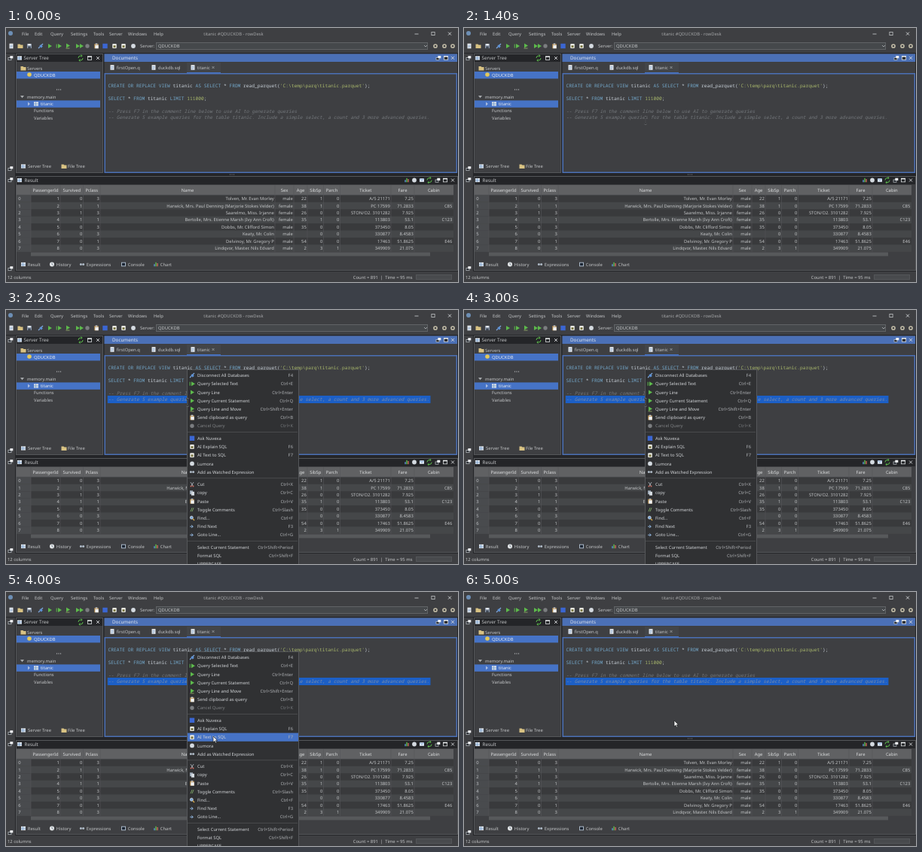
Recreate the animation shown at these times as an HTML page. Size 600x338 px, loop 8000 ms.

```html
<!DOCTYPE html>
<html lang="en">
<head>
<meta charset="utf-8">
<title>SQL editor</title>
<style>
html, body { margin: 0; width: 100%; height: 100%; overflow: hidden; background: #242527; }
svg { display: block; width: 600px; height: 338px; }
text { font: 5.85px "Noto Sans", "Open Sans", sans-serif; text-rendering: geometricPrecision; white-space: pre; }
.head { font-size: 6.3px; }
.code { font: 6.245px "Noto Sans Mono", "Liberation Mono", monospace; }
.note { font-style: italic; }
</style>
</head>
<body>
<svg id="stage" viewBox="0 0 600 338" xmlns="http://www.w3.org/2000/svg"></svg>
<script>
const LOOP = 8000, CHAR = 3.747, LEFT = 135.5;
const INK = '#c3c5c7', BASE = '#3e3f42', DARK = '#242528', EDGE = '#55575a';
const BLUE = '#4673c6', GREEN = '#5dba4c', GOLD = '#d9ab48', PALE = '#d4dae0';

const rect = (x, y, w, h, fill, more = '') =>
  `<rect x="${x}" y="${y}" width="${w}" height="${h}" fill="${fill}" ${more}/>`;
const box = (x, y, w, h, fill, line, weight = 1) =>
  rect(x + weight / 2, y + weight / 2, w - weight, h - weight, fill, `stroke="${line}" stroke-width="${weight}"`);
const path = (d, fill, line = 'none', w = 1) =>
  `<path d="${d}" fill="${fill}" stroke="${line}" stroke-width="${w}"/>`;
const dot = (x, y, r, fill) => `<circle cx="${x}" cy="${y}" r="${r}" fill="${fill}"/>`;
// y is the middle of the line
const text = (s, x, y, fill = INK, anchor = 'start', cls = '') =>
  `<text class="${cls}" x="${x}" y="${y + 2.1}" fill="${fill}" text-anchor="${anchor}">${s}</text>`;

// Small icons, centred on x, y
const icon = {
  page: (x, y) => rect(x - 2.5, y - 3.3, 5, 6.6, '#e6eaee') +
    path(`M${x - 1.5} ${y - 1}h3m-3 1.5h3m-3 1.5h2`, 'none', '#6f95c4', .6),
  folder: (x, y) => path(`M${x - 3.5} ${y + 3}v-5.5h3l1 1h3v4.5z`, '#d8c283'),
  save: (x, y) => rect(x - 3, y - 3, 6, 6, '#8d99aa') + rect(x - 1.7, y - 3, 3.4, 2.2, '#eef1f4') +
    rect(x - 1.8, y + .5, 3.6, 2.5, '#414a57'),
  plug: (x, y) => path(`M${x - 3} ${y + 3}l2-2M${x + 1} ${y - 1}l2-2`, 'none', '#7ea8dd', 1.2) +
    path(`M${x - 1.8} ${y}l2-2l2.6 2.6l-2 2z`, '#5e93d8'),
  play: (x, y, c = GREEN) => path(`M${x - 2} ${y - 3}l5 3l-5 3z`, c),
  playLine: (x, y) => icon.play(x + 1, y) + path(`M${x - 2.8} ${y - 2.5}v5`, 'none', GREEN, 1),
  playDown: (x, y) => icon.play(x, y - .5) + path(`M${x - 2.5} ${y + 3}h5`, 'none', '#9eb96a', .8),
  paste: (x, y) => rect(x - 2.8, y - 2.8, 5.6, 6, '#b28a4c') + rect(x - 1.7, y - 1.3, 4.4, 4.5, '#eef1f4') +
    rect(x - 1.3, y - 3.5, 2.6, 1.4, '#cfd3d8'),
  stop: (x, y) => dot(x, y, 2.7, '#7b7d80'),
  cube: (x, y) => rect(x - 3.2, y - 3.2, 6.4, 6.4, '#3b66d2'),
  bot: (x, y) => rect(x - 2.8, y - 3, 5.6, 6, '#e9e9e2', 'rx="1"') + rect(x - 1.4, y - .8, 2.8, 2.8, '#77733f'),
  disc: (x, y) => dot(x, y, 2.9, PALE),
  watch: (x, y) => dot(x - 1.6, y, 1.5, '#aebac6') + dot(x + 1.6, y, 1.5, '#aebac6'),
  cut: (x, y) => path(`M${x - 2} ${y - 3}l3 5m1-5l-3 5`, 'none', '#b8c0c8', .8) +
    dot(x - 1.5, y + 2.5, 1, '#d06a5e') + dot(x + 1.5, y + 2.5, 1, '#d06a5e'),
  copy: (x, y) => rect(x - 3, y - 3, 4, 5, '#9eaab7') + rect(x - 1, y - 1.5, 4, 5, PALE),
  slash: (x, y) => path(`M${x - 2} ${y + 2.5}l2-5m0 5l2-5`, 'none', '#8dbb72', .8),
  find: (x, y) => path(`M${x + .8} ${y + .8}l2.3 2.3`, 'none', GOLD, 1.2) +
    `<circle cx="${x - .7}" cy="${y - .7}" r="2" fill="#7da9d8" stroke="#dde2e6" stroke-width=".7"/>`,
  next: (x, y) => path(`M${x - 2.8} ${y}h4m-2-2l2 2l-2 2`, 'none', '#8fb4dd', 1),
  sync: (x, y) => path(`M${x - 3} ${y}q0-3 3-3h2m-1.4-1.4l1.6 1.4l-1.6 1.4M${x + 3} ${y}q0 3-3 3h-2m1.4-1.4l-1.6 1.4l1.6 1.4`, 'none', GREEN, 1),
  pop: (x, y) => rect(x - 3, y - .5, 4, 3.2, '#20242a', 'stroke="#c4c8cd" stroke-width=".7"') +
    rect(x - .7, y - 2.8, 4, 3.2, '#f0f2f4'),
  pane: (x, y) => rect(x - 3, y - 2.7, 6, 5.4, '#f0f2f4') + rect(x - 2.3, y - 1.2, 4.6, 3.2, '#26282b'),
  close: (x, y) => path(`M${x - 2} ${y - 2}l4 4m0-4l-4 4`, 'none', '#d4d6d8', .9),
  table: (x, y) => rect(x - 3, y - 2.6, 6, 5.2, '#e8ebee') +
    path(`M${x - 3} ${y - .6}h6m-6 1.6h6M${x - .6} ${y - 2.6}v5.2`, 'none', '#6390c7', .6),
  clock: (x, y) => dot(x, y, 3, '#e5e8ea') + path(`M${x} ${y - 2}v2l1.5 1`, 'none', '#4a5a6a', .7),
  screen: (x, y) => box(x - 3, y - 2.8, 6, 5.6, '#1c2634', '#a9b7c6'),
  mail: (x, y) => rect(x - 3, y - 2.3, 6, 4.6, '#dbe6f3') + path(`M${x - 3} ${y - 2.3}l3 2.5l3-2.5`, 'none', '#5f8fcc', .7),
  bars: (x, y) => rect(x - 2.7, y - .3, 1.4, 3, '#5a93d8') + rect(x - .7, y - 2.7, 1.4, 5.4, GREEN) +
    rect(x + 1.3, y - 1.5, 1.4, 4.2, '#cf6859'),
  gear: (x, y) => `<circle cx="${x}" cy="${y}" r="2.1" fill="none" stroke="#c5bfa9" stroke-width="1.5"/>`
};
const icons = (list, y) => list.map(([name, x]) => icon[name](x, y)).join('');
const dots = (x, y, fill) => [-2.5, 0, 2.5].map(d => dot(x + d, y, .7, fill)).join('');

function topBars() {
  let s = rect(0, 0, 600, 33, BASE) + dot(6, 7, 3, '#6d8fb5');
  const menus = [['File', 21], ['Edit', 38], ['Query', 59], ['Settings', 86], ['Tools', 116],
    ['Server', 137], ['Windows', 162], ['Help', 196]];
  s += menus.map(([m, x]) => text(m, x, 7.6)).join('');
  s += text('titanic #QDUCKDB - rowDesk', 302, 7.6, '#a3a5a7', 'middle');
  s += path('M542.5 8h5', 'none', '#c0c2c4', .9) + box(564.5, 5, 5, 5, 'none', '#c0c2c4', .8) + icon.close(589, 7.6);
  s += icons([['page', 7], ['folder', 19], ['save', 31], ['plug', 46], ['play', 58], ['playLine', 70],
    ['playDown', 82], ['play', 95], ['play', 100], ['stop', 108], ['paste', 120], ['cube', 131.5], ['bot', 144],
    ['bot', 156], ['disc', 169]], 24);
  s += text('Server:', 178, 24.2) + box(199, 19, 361, 10, '#45484b', '#606366') + text('QDUCKDB', 202, 24.2);
  s += path('M555 23l2 2l2-2', 'none', '#a9acaf', .9);
  return s + icons([['gear', 570], ['gear', 582], ['gear', 593]], 24);
}

function treePanel() {
  let s = rect(0, 34, 12, 290, BASE);
  s += [40, 187, 202, 320].map(y => icon.pop(6, y)).join('');
  s += box(13, 34, 116, 159, BASE, EDGE) + rect(14, 35, 114, 10, DARK);
  s += icon.table(18, 40) + text('Server Tree', 23.5, 40.2, INK, 'start', 'head');
  s += icons([['sync', 99], ['pane', 111], ['close', 122]], 40);
  s += rect(14, 58, 111, 9.4, BLUE) + rect(14, 96.4, 111, 9.4, BLUE);
  s += icon.folder(23, 53.5) + text('Servers', 28, 53.6);
  s += dot(31, 62, 2.8, '#e3c95c') + text('QDUCKDB', 37, 62.7, '#e6eaf0') + dots(70, 82, '#aeb1b4');
  s += path('M19 90l2.5 3.2l2.5-3.2z', '#a8abae') + text('memory.main', 28, 91.6);
  s += path('M29 98.5l3 2.5l-3 2.5z', '#a9bce0') + icon.table(40, 101) + text('titanic', 46, 101.1, '#e6eaf0');
  s += text('Functions', 37, 110.3) + text('Variables', 37, 119.7);
  return s + icon.table(23, 184) + text('Server Tree', 29, 184.2) + icon.folder(77, 184) + text('File Tree', 82, 184.2);
}

const NOTE = '-- Generate 5 example queries for the table titanic. Include a simple select, a count and 3 more advanced queries.';

function code(row, parts, cls = '') {
  const spans = parts.map(([s, c]) => `<tspan fill="${c}">${s}</tspan>`).join('');
  return `<text class="code ${cls}" x="${LEFT}" y="${79 + row * 8.45}">${spans}</text>`;
}

function editor() {
  const bar = '#4b70b6';
  let s = rect(130.5, 34, 468.5, 159, BASE) + rect(130.5, 34.5, 468.5, 10.5, bar);
  s += box(130.5, 60, 468.5, 133, BASE, bar, 1.5);
  s += text('Documents', 141, 39.8, '#e0e6f0', 'start', 'head') + icons([['pop', 574], ['pane', 584], ['close', 593]], 39.8);
  s += rect(240, 58.8, 45, 1.2, BLUE) + rect(240, 46, 45, 13, '#434548');
  s += [['firstOpen.q', 141], ['duckdb.sql', 196], ['titanic', 248]]
    .map(([n, x]) => icon.page(x, 52.5) + text(n, x + 5.8, 52.7)).join('');
  s += path('M273.5 51l3 3m0-3l-3 3', 'none', '#9fa2a5', .8);
  s += rect(0, 114, 0, 10, '#1c5fc6', 'id="sel"');
  const key = '#74a9cc', name = '#c6ced6', str = '#a9b86c', grey = '#74787c';
  s += code(0, [['CREATE OR REPLACE VIEW ', key], ['titanic ', name], ['AS SELECT ', key], ['* ', name],
    ['FROM ', key], ['read_parquet(', name], ["'C:\\temp\\parq\\titanic.parquet'", str], [');', name]]);
  s += code(2, [['SELECT ', key], ['* ', name], ['FROM ', key], ['titanic ', name], ['LIMIT ', key], ['111000', str], [';', name]]);
  s += code(4, [['-- Press F7 in the comment line below to use AI to generate queries', grey]], 'note');
  s += `<g id="note"><text class="code note" x="${LEFT}" y="121.2">${NOTE}</text></g>`;
  return s + rect(563.3, 114.5, .8, 9, '#e3e6ea', 'id="caret"');
}

const COLS = [['PassengerId', 33, 72], ['Survived', 72, 102.5], ['Pclass', 102.5, 125], ['Name', 125, 357],
  ['Sex', 357, 382], ['Age', 382, 400], ['SibSp', 400, 421.5], ['Parch', 421.5, 443.5], ['Ticket', 443.5, 511],
  ['Fare', 511, 542], ['Cabin', 542, 593.5]];
const ROWS = `1|0|3|Tolven, Mr. Evan Morley|male|22|1|0|A/5 21171|7.25|
2|1|1|Harwick, Mrs. Paul Denning (Marjorie Stokes Velder)|female|38|1|0|PC 17599|71.2833|C85
3|1|3|Saarelmo, Miss. Irjanne|female|26|0|0|STON/O2. 3101282|7.925|
4|1|1|Bertolle, Mrs. Etienne Marsh (Ivy Ann Croft)|female|35|1|0|113803|53.1|C123
5|0|3|Dobbs, Mr. Clifford Simon|male|35|0|0|373450|8.05|
6|0|3|Keaty, Mr. Colin|male||0|0|330877|8.4583|
7|0|1|Delvinoy, Mr. Gregory P|male|54|0|0|17463|51.8625|E46
8|0|3|Lindqvor, Master. Nils Edvard|male|2|3|1|349909|21.075|`.split('\n').map(r => r.split('|'));

function results() {
  let s = box(13, 197, 587, 126, BASE, EDGE) + rect(14, 198, 585, 10, DARK);
  s += icon.table(18, 202.5) + text('Result', 24.5, 202.7, INK, 'start', 'head');
  s += icons([['bars', 532], ['disc', 542], ['mail', 552], ['sync', 562], ['pop', 573], ['pane', 583], ['close', 593]], 202.5);
  s += rect(14, 209, 580, 13, '#606163');
  s += COLS.map(([n, a, b]) => text(n, (a + b) / 2, 215.6, '#dcdedf', 'middle')).join('');
  ROWS.forEach((row, i) => {
    const top = 222.4 + i * 9.43, y = top + 4.7;
    s += rect(14, top, 580, 9.43, i % 2 ? '#454749' : '#393a3c') + rect(14, top, 19, 9.43, '#494b4e');
    s += text(i, 18, y, '#c0c3c6', 'middle');
    s += row.map((v, k) => v && text(v, COLS[k][2] - 1.2, y, INK, 'end')).join('');
  });
  const lines = COLS.map(c => `M${c[1]} 209v89`).join('');
  s += path(lines, 'none', EDGE, .6) + path('M14 222.2h580', 'none', EDGE, .6);
  s += rect(33, 298.5, 530, 5, '#57595b');
  s += [['Result', 'table', 23], ['History', 'clock', 61], ['Expressions', 'watch', 101],
    ['Console', 'screen', 156], ['Chart', 'bars', 199]]
    .map(([n, i, x]) => icon[i](x, 314.5) + text(n, x + 5.8, 314.6)).join('');
  s += dots(300, 195, '#6c6e71') + rect(0, 324, 600, 14, BASE) + text('12 columns', 2, 331.5);
  return s + text('Count = 891  |  Time = 95 ms', 539.5, 331.5, INK, 'end') + box(544, 328, 48, 7, '#484a4d', '#545659');
}

// label, shortcut, icon; an empty entry is a separator
const MENU = [['Disconnect All Databases', 'F4', 'plug'], ['Query Selected Text', 'Ctrl+E', 'playLine'],
  ['Query Line', 'Ctrl+Enter', 'play'], ['Query Current Statement', 'Ctrl+Q', 'play'],
  ['Query Line and Move', 'Ctrl+Shift+Enter', 'playDown'], ['Send clipboard as query', 'Ctrl+B', 'paste'],
  ['Cancel Query', 'Ctrl+K', 'stop'], [], ['Ask Nuvexa', '', 'cube'], ['AI Explain SQL', 'F6', 'bot'],
  ['AI Text to SQL', 'F7', 'bot'], ['Lumora', '', 'disc'], ['Add as Watched Expression', '', 'watch'], [],
  ['Cut', 'Ctrl+X', 'cut'], ['copy', 'Ctrl+C', 'copy'], ['Paste', 'Ctrl+V', 'paste'],
  ['Toggle Comments', 'Ctrl+Slash', 'slash'], ['Find...', 'Ctrl+F', 'find'], ['Find Next', 'F3', 'next'],
  ['Goto Line...', 'Ctrl+G', 'next'], [], ['Select Current Statement', 'Ctrl+Shift+Period'],
  ['Format SQL', 'Ctrl+Shift+F'], ['UPPERCASE', '']];
const rowY = {};

function menu() {
  let y = 87, rows = '';
  for (const [label, keys, pic] of MENU) {
    if (!label) {
      rows += path(`M241 ${y - 3.1}h146`, 'none', EDGE, .7);
      y += 5.2;
      continue;
    }
    const off = label === 'Cancel Query';
    rowY[label] = y;
    rows += (pic ? icon[pic](247, y) : '') + text(label, 254, y, off ? '#808386' : '#d0d3d6') +
      text(keys, 381, y, off ? '#74777a' : '#b0b3b6', 'end');
    y += 11.22;
  }
  return `<g id="menu">${box(240, 79, 149, 264, '#303133', EDGE)}` +
    rect(241, 0, 147, 11.2, BLUE, 'id="hover"') + rows + '</g>';
}

const serif = 'M-2-5h1.5l.5.5l.5-.5h1.5M0-4.5v9M-2 5h1.5l.5-.5l.5.5h1.5';
const pointers = `<g id="beam">${path(serif, 'none', '#8e9194', 1.3)}${path(serif, 'none', '#0c0d0e', .9)}</g>` +
  `<g id="arrow">${path('M0 0v8l1.9-1.7l1.3 2.7l1.3-.6l-1.3-2.7h2.5z', '#f5f5f5', '#101112', .6)}</g>`;

const $ = id => document.getElementById(id);
$('stage').innerHTML = rect(0, 0, 600, 338, DARK) + topBars() + treePanel() + editor() + results() + menu() + pointers;

const BEAM = [[200, 325, 110], [400, 236.5, 128.5], [600, 241, 125.5], [800, 241, 123], [3200]];
const ARROW = [[3200, 240, 138], [3400, 258, 159], [3600, 270, 184], [3800, 277, 197], [4000, 275, 192], [4800, 279, 171]];
const HOVER = [[3400, 'Cancel Query'], [3600, 'AI Explain SQL'], [3800, 'AI Text to SQL']];
const SELECT = [[1600, NOTE.indexOf('queries'), 7], [1800, 0, NOTE.length]];

const at = (steps, t) => (steps.filter(s => s[0] <= t).pop() || []).slice(1);
const show = (id, on) => $(id).setAttribute('visibility', on ? 'inherit' : 'hidden');

function place(id, [x, y]) {
  show(id, x !== undefined);
  if (x !== undefined) $(id).setAttribute('transform', `translate(${x} ${y})`);
}

function draw(t) {
  place('beam', at(BEAM, t));
  place('arrow', at(ARROW, t));
  const [from = 0, count = 0] = at(SELECT, t);
  $('sel').setAttribute('x', LEFT + from * CHAR - .7);
  $('sel').setAttribute('width', count && count * CHAR + 1.5);
  $('note').setAttribute('fill', t >= 1800 ? '#7d8ea8' : '#74787c');
  show('caret', t >= 1800 && t < 2200);
  show('menu', t >= 2200 && t < 4400);
  const [label] = at(HOVER, t);
  show('hover', label);
  if (label) $('hover').setAttribute('y', rowY[label] - 5.6);
}

const start = performance.now();
function tick() {
  draw((performance.now() - start) % LOOP);
  requestAnimationFrame(tick);
}
tick();
</script>
</body>
</html>
```
